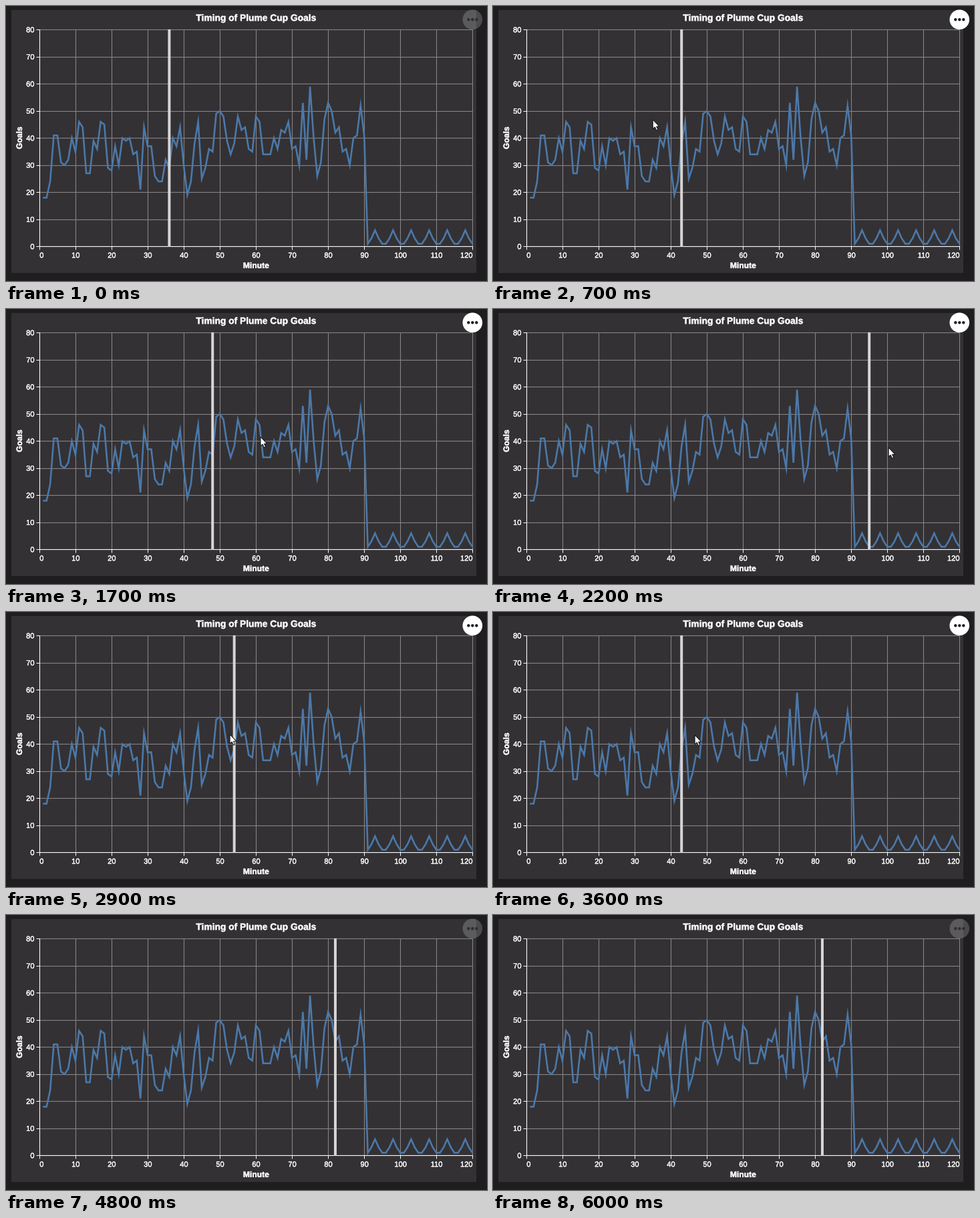
Write a matplotlib script that moves like this. It is 720x411 px and loops after 6.1 s.

```python
import numpy as np
import matplotlib.pyplot as plt
from matplotlib import patheffects
from matplotlib.animation import FuncAnimation
from matplotlib.collections import PolyCollection
from matplotlib.colors import to_rgb
from matplotlib.patches import Circle, Polygon, Rectangle

W, H, DPI = 720, 411, 100
FRAMES, INTERVAL = 61, 100
PX = 72 / DPI  # points per pixel
X0, Y0, SX, SY = 49.9, 359.4, 5.403, 4.05
X1, Y1 = X0 + 120 * SX, Y0 - 80 * SY

OUTER, CARD, GRID, INK = "#1f1d20", "#333134", "#858384", "#f8f8f8"
BLUE, RULE, DOT = "#4c78a8", "#d8d5d6", "#1b1e23"
STROKE = 2.6

# Main highs and lows of normal time: minute, goals
LANDMARKS = np.array([
    (1, 18), (3, 24), (4, 41), (7, 30), (12, 44), (13, 27), (18, 45), (19, 29),
    (24, 39), (27, 35), (28, 21), (29, 44), (33, 24), (39, 44), (41, 19),
    (44, 46), (45, 25), (50, 50), (53, 34), (55, 48), (59, 35), (60, 48),
    (63, 34), (69, 46), (72, 30), (73, 53), (74, 32), (75, 59), (77, 26),
    (80, 53), (86, 30), (89, 52), (90, 41),
])

# Pointer stops: frame, x, y
STOPS = np.array([
    (1, 430, 20), (6, 282, 161), (9, 173, 180), (13, 309, 190), (16, 310, 190),
    (17, 381, 191), (21, 563, 206), (24, 626, 208), (28, 342, 185),
    (30, 329, 182), (32, 282, 183), (35, 281, 183), (39, 416, 188),
    (41, 416, 188), (43, 493, 58),
])
ENTER, LEAVE = STOPS[0, 0], STOPS[-1, 0]
ARROW = 1.12 * np.array([(0, 0), (0, 12.4), (2.8, 9.9), (4.8, 14.4), (6.8, 13.5),
                         (4.9, 9.2), (8.7, 9.2)])


def goal_counts():
    """Seeded zigzag between the landmarks, then small ripples in extra time."""
    minutes = np.arange(1, 121)
    rng = np.random.default_rng(4)
    zigzag = np.where(minutes % 2, 1, -1) * rng.uniform(0.5, 5, minutes.size)
    zigzag[np.isin(minutes, LANDMARKS[:, 0])] = 0
    regular = np.interp(minutes, *LANDMARKS.T) + zigzag
    ripple = 1.2 + 4.3 * np.maximum(0, np.cos(2 * np.pi * (minutes - 93) / 5))
    return minutes, np.round(np.where(minutes <= 90, regular, ripple))


def pointer(frame):
    """Smooth pointer position that never overshoots a stop."""
    t, xy = STOPS[:, 0], STOPS[:, 1:]
    slope = np.diff(xy, axis=0) / np.diff(t)[:, None]
    a, b = slope[:-1], slope[1:]
    speed = np.zeros(xy.shape)
    speed[1:-1] = np.where(a * b > 0, 2 * a * b / np.where(a * b > 0, a + b, 1), 0)
    i = int(np.clip(np.searchsorted(t, frame, side="right") - 1, 0, len(t) - 2))
    span = t[i + 1] - t[i]
    u = np.clip((frame - t[i]) / span, 0, 1)
    ease = u * u * (3 - 2 * u)
    bend = span * u * (1 - u) * ((1 - u) * speed[i] - u * speed[i + 1])
    return xy[i] + ease * (xy[i + 1] - xy[i]) + bend


def rule_minute(frame):
    """Nearest minute under the pointer, one frame late."""
    seen = min(frame - 1, LEAVE)
    if seen <= ENTER:
        return 36
    return round((pointer(seen)[0] - X0) / SX)


def button_opacity(frame):
    if frame <= LEAVE:
        rise = np.clip((frame - 0.3) / 2, 0, 1)
        return 0.2 + 0.8 * np.sin(rise * np.pi / 2)
    return 1 - 0.8 * np.clip((frame - 43.8) / 4, 0, 1) ** 1.7


def blend(top, base, alpha):
    return alpha * np.array(to_rgb(top)) + (1 - alpha) * np.array(to_rgb(base))


def miter_tips(points, width, limit=10):
    """Pointed corners for a polyline drawn with bevel joins."""
    tips = []
    for a, b, c in zip(points, points[1:], points[2:]):
        u, v = (b - a) / np.hypot(*(b - a)), (c - b) / np.hypot(*(c - b))
        side = -np.sign(u[0] * v[1] - u[1] * v[0])
        n1, n2 = (side * np.array([-d[1], d[0]]) for d in (u, v))
        half = np.hypot(*(n1 + n2)) / 2
        if side and half > 1 / limit:
            tip = (n1 + n2) / 2 / half**2
            tips.append([b + width / 2 * k for k in (0 * n1, n1, tip, n2)])
    return tips


fig = plt.figure(figsize=(W / DPI, H / DPI), dpi=DPI, facecolor=OUTER)
ax = fig.add_axes([0, 0, 1, 1])
ax.set(xlim=(0, W), ylim=(H, 0))
ax.axis("off")


def line(xs, ys, color, width=1.0, **kw):
    return ax.plot(xs, ys, color=color, lw=width * PX, **kw)[0]


def label(x, y, text, size=11.1, **kw):
    style = dict(family="Liberation Sans", color=INK, ha="center", va="baseline")
    thicken = patheffects.withStroke(linewidth=0.35 * PX, foreground=INK)
    ax.text(x, y, text, fontsize=size * PX, path_effects=[thicken], **{**style, **kw})


ax.add_patch(Rectangle((7.5, 6), 696.5, 393, fc=CARD, lw=0))

for minute in range(0, 121, 10):
    x = X0 + minute * SX
    line([x, x], [Y1, Y0], GRID, 1.1, zorder=1)
    line([x, x], [Y0, Y0 + 5], INK, zorder=2, solid_capstyle="butt")
    edge = {0: "left", 120: "right"}.get(minute, "center")
    label(x + 0.4, 376.2, str(minute), ha=edge)

for goals in range(0, 81, 10):
    y = Y0 - goals * SY
    line([X0, X1], [y, y], GRID, 1.1, zorder=1)
    line([X0 - 5, X0], [y, y], INK, zorder=2, solid_capstyle="butt")
    label(42.5, y + 3.9, str(goals), ha="right")

line([X0, X0, X1], [Y1, Y0, Y0], INK, 1.1, zorder=2)
label(374.5, 22.2, "Timing of Plume Cup Goals", 13.8, weight="bold")
label(374.5, 391.8, "Minute", 12.1, weight="bold")
label(27, 197, "Goals", 12.1, weight="bold", rotation=90, ha="right", va="center")

minutes, counts = goal_counts()
curve = np.column_stack([X0 + SX * minutes, Y0 - SY * counts])
line(*curve.T, BLUE, STROKE, zorder=3, solid_joinstyle="bevel", solid_capstyle="butt")
ax.add_collection(PolyCollection(miter_tips(curve, STROKE), fc=BLUE, lw=0, zorder=3))

rule = line([0, 0], [Y1 - 0.5, Y0 + 0.5], RULE, 4, zorder=4,
            solid_capstyle="butt", snap=False)
button = ax.add_patch(Circle((698.3, 20.3), 14.8, fc="white", lw=0, zorder=5))
dots = [ax.add_patch(Circle((698.3 + dx, 20.3), 2.2, lw=0, zorder=6))
        for dx in (-6, 0, 6)]
arrow = ax.add_patch(Polygon(ARROW, fc="white", ec="#111111", lw=PX, zorder=7))


def update(frame):
    x = X0 + SX * rule_minute(frame)
    rule.set_xdata([x, x])
    alpha = button_opacity(frame)
    button.set_alpha(alpha)
    for dot in dots:
        dot.set_facecolor(blend(DOT, CARD, alpha))
    arrow.set_visible(bool(ENTER <= frame <= LEAVE))
    arrow.set_xy(ARROW + pointer(frame))
    return [rule, button, *dots, arrow]


anim = FuncAnimation(fig, update, frames=FRAMES, interval=INTERVAL,
                     init_func=lambda: update(0), repeat=True, repeat_delay=0)
plt.show()
```
